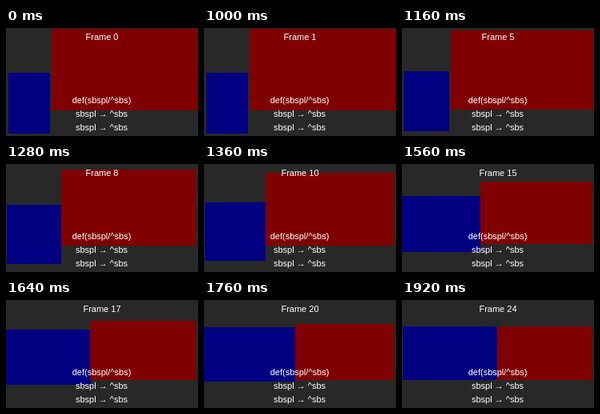
Write an HTML page that moves like this. It is 240 px wide and 135 px high and loops after 2920 ms.

```html
<!DOCTYPE html>
<html lang="en">
<head>
<meta charset="utf-8">
<title>Two panels</title>
<style>
  html, body { margin: 0; width: 100%; height: 100%; overflow: hidden; background: #282828; }
  svg { display: block; width: 100%; height: 100%; }
  text { font: 11px "Liberation Sans", Arial, sans-serif; fill: #fff; text-anchor: middle; }
</style>
</head>
<body>
<svg viewBox="0 0 240 135">
  <rect width="240" height="135" fill="#282828"/>
  <rect id="blue" fill="#000080" shape-rendering="crispEdges"/>
  <rect id="red" fill="#800000" shape-rendering="crispEdges"/>
  <text id="title" x="120" y="15">Frame 0</text>
  <text x="119.5" y="94">def(sbspl/^sbs)</text>
  <text x="119.5" y="111">sbspl → ^sbs</text>
  <text x="119.5" y="128">sbspl → ^sbs</text>
</svg>
<script>
const HOLD = 1000, STEP = 40, LAST = 24, LOOP = 2920;
const byId = id => document.getElementById(id);
const blue = byId('blue'), red = byId('red'), title = byId('title');

function place(el, left, top, right, bottom) {
  el.setAttribute('x', left);
  el.setAttribute('y', top);
  el.setAttribute('width', right - left);
  el.setAttribute('height', bottom - top);
}

function draw(ms) {
  const n = ms < HOLD ? 0 : Math.min(LAST, 1 + Math.floor((ms - HOLD) / STEP));
  const u = Math.max(0, n - 1) / (LAST - 1);
  const e = (1 - Math.cos(Math.PI * u)) / 2;
  const arc = Math.sin(Math.PI * e);
  // Edge eased from a to b, bowed midway, snapped to whole pixels.
  const edge = (a, b, bow = 0) => Math.floor(a + (b - a) * e + bow * arc + 1e-6);

  place(blue, edge(3.1, 1.1, -1.15), edge(56, 33), edge(55, 119, 1), edge(132, 100));
  place(red, edge(57, 119, -0.2), edge(1, 33), edge(240, 238.8, -1.25), edge(103, 100));
  title.textContent = 'Frame ' + n;
}

const start = performance.now();
function tick() {
  draw((performance.now() - start) % LOOP);
  requestAnimationFrame(tick);
}
tick();
</script>
</body>
</html>
```
